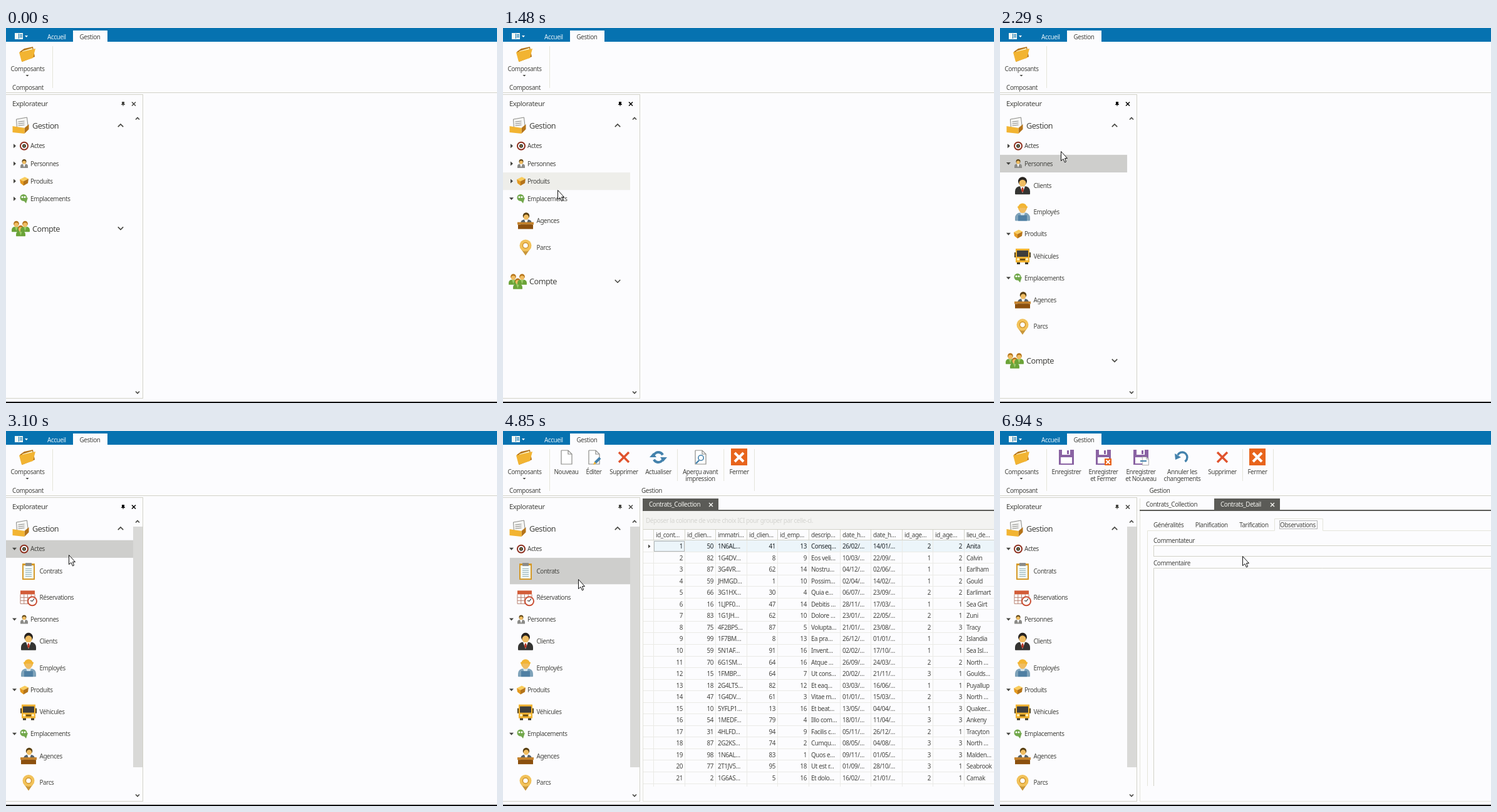
Recreate the animation shown at these times as an HTML page with a canvas. Size 784x600 px, loop 7080 ms.

```html
<!DOCTYPE html>
<html lang="fr">
<head>
<meta charset="utf-8">
<title>Gestion</title>
<style>
  html, body { margin: 0; width: 100%; height: 100%; overflow: hidden; background: #fcfcfe; }
  canvas { display: block; }
</style>
</head>
<body>
<canvas id="stage" width="784" height="600"></canvas>
<script>
const ctx = document.getElementById('stage').getContext('2d');
const LOOP = 7080, TICKS = 105, LIST_TICK = 63, DETAIL_TICK = 100;
const BG = '#fcfcfe', INK = '#464642', EDGE = '#e4e4da', GRID = '#eaeae6', RULE = '#d2d2c8',
      DARK = '#5b5b57', HOVER = '#eeeeea', PRESS = '#cececc', THUMB = '#d9d9d7',
      RED = '#e0522c', ORANGE = '#e8641c', BLUE = '#4482ac', SKIN = '#f0bd62',
      GOLD = '#f2b432', BROWN = '#b5741a', PAPER = '#8b8b88';

// ---- drawing helpers ----
function rect(color, x, y, w, h) { ctx.fillStyle = color; ctx.fillRect(x, y, w, h); }

function disc(color, x, y, r) {
  ctx.fillStyle = color;
  ctx.beginPath();
  ctx.arc(x, y, r, 0, Math.PI * 2);
  ctx.fill();
}

function trace(pts) {
  ctx.beginPath();
  for (let i = 0; i < pts.length; i += 2) ctx.lineTo(pts[i], pts[i + 1]);
}

function poly(color, ...pts) { trace(pts); ctx.fillStyle = color; ctx.fill(); }

function line(color, width, ...pts) {
  trace(pts);
  ctx.strokeStyle = color;
  ctx.lineWidth = width;
  ctx.stroke();
}

function arc(color, width, r, from, to) {
  ctx.strokeStyle = color;
  ctx.lineWidth = width;
  ctx.beginPath();
  ctx.arc(0, 0, r, from, to);
  ctx.stroke();
}

function frame(color, x, y, w, h, dash = []) {
  ctx.setLineDash(dash);
  ctx.strokeStyle = color;
  ctx.lineWidth = 1;
  ctx.strokeRect(x + .5, y + .5, w, h);
  ctx.setLineDash([]);
}

function setFont(size = 9.9) {
  ctx.font = `${size}px "Noto Sans", "Open Sans", sans-serif`;
  ctx.letterSpacing = `${-size * .041}px`;
}

function text(str, x, y, { size = 9.9, color = INK, align = 'left' } = {}) {
  setFont(size);
  ctx.textAlign = align;
  ctx.fillStyle = color;
  ctx.fillText(str, x, y + size * .36);
}

function at(x, y, draw, scale = 1) {
  ctx.save();
  ctx.translate(x, y);
  ctx.scale(scale, scale);
  draw();
  ctx.restore();
}

function cross(color, r, width, x = 0, y = 0) {
  line(color, width, x - r, y - r, x + r, y + r);
  line(color, width, x - r, y + r, x + r, y - r);
}

const chevron = (x, y, up, r) => line(INK, 1.6, x - r, y + up * r / 2, x, y - up * r / 2, x + r, y + up * r / 2);

// ---- icons, each drawn around its own centre ----
function person(coat, hair, shirt = '#fff') {
  ctx.fillStyle = coat;
  ctx.beginPath();
  ctx.roundRect(-12, 1, 24, 13, [8, 8, 1, 1]);
  ctx.fill();
  poly(shirt, -4, 1, 4, 1, 0, 12);
  disc(hair, 0, -7, 7);
  disc(SKIN, 0, -4, 5.5);
}

function page() {
  const sheet = [-8, -11, 3, -11, 9, -5, 9, 11, -8, 11, -8, -11];
  poly('#fff', ...sheet);
  line(PAPER, 1.2, ...sheet);
  line(PAPER, 1.2, 3, -11, 3, -5, 9, -5);
}

function floppy() {
  rect('#8a63a3', -12, -12, 24, 24);
  rect('#fff', -7, -12, 13, 8);
  rect('#8a63a3', 1, -11, 3, 6);
  rect('#fff', -9, 0, 18, 10);
}

const icons = {
  folder() {
    poly(BROWN, -12, -4, -5, -9, 9, -12, 12, 4, -8, 12);
    poly('#fff5c8', -8, -5, 8, -10, 9, -5, -8, 0);
    poly(GOLD, -13, -3, 13, -9, 9, 6, -9, 12);
  },
  drawer() {
    poly('#f6f6f4', -7, -10, 10, -13, 12, 4, -6, 6);
    line(PAPER, 1, -6, 5, -7, -10, 10, -13, 12, 4);
    for (let y = -6; y <= 0; y += 3) line(PAPER, 1, -4, y, 6, y - 1);
    poly(BROWN, 6, 4, 13, -2, 13, 6, 6, 13);
    poly(GOLD, -13, 1, 6, 4, 6, 13, -13, 11);
  },
  crowd() {
    for (let i = -1; i <= 1; i++)
      at(i * 7, i ? -3 : 4, () => person('#6ba338', BROWN, '#9bcb68'), .62);
  },
  target() {
    ['#8c2d1c', '#fff', '#3c4038', '#d8a040'].forEach((color, i) => disc(color, 0, 0, 7 - 2 * i));
  },
  user: () => at(0, 0, () => person(PAPER, '#5f4618'), .5),
  cube() {
    poly('#f9cc5c', -7, -3, 1, -7, 7, -4, -1, 0);
    poly('#e49a20', -7, -3, -1, 0, -1, 7, -6, 3);
    poly(BROWN, -1, 0, 7, -4, 6, 3, -1, 7);
  },
  place() {
    disc('#72a84c', -1, -2, 5.5);
    poly('#72a84c', -3, 0, 6, -2, 3, 7);
    for (const x of [-3, 1]) disc('#fff', x, -3, 1.5);
  },
  clipboard() {
    rect('#d69a28', -10, -12, 20, 26);
    rect('#f2fafa', -8, -9, 16, 21);
    rect(PAPER, -5, -13, 10, 5);
    for (let y = -4; y < 9; y += 3) rect('#8fadb4', -5, y, 10, 1);
  },
  booking() {
    rect('#fff', -13, -11, 23, 21);
    rect('#d25c38', -13, -11, 23, 6);
    for (let i = 0; i < 5; i++) line('#b88070', 1, -13 + i * 5.75, -5, -13 + i * 5.75, 10);
    for (let y = 0; y <= 10; y += 5) line('#b88070', 1, -13, y, 10, y);
    disc('#c94f34', 6, 6, 8);
    disc('#fff', 6, 6, 6);
    line('#444', 1.2, 9, 2, 6, 6, 3, 5);
  },
  client() {
    person('#343432', '#292420');
    poly('#b43220', -1, 3, 1, 3, 2, 8, 0, 11, -2, 8);
  },
  worker() {
    person('#7fa3ba', GOLD, '#d8e6ec');
    rect('#4f7fa3', -7, 5, 14, 9);
    rect(GOLD, -8, -9, 16, 2);
  },
  bus() {
    for (const x of [-9, 4]) rect('#3c3828', x, 8, 5, 5);
    rect(GOLD, -11, -12, 22, 22);
    rect('#3e3e3c', -9, -9, 18, 10);
    for (const x of [-13, 11]) rect('#54441c', x, -6, 2, 8);
    for (const x of [-7, 7]) disc('#fff3c0', x, 5, 2);
    rect('#705010', -4, 4, 8, 3);
  },
  desk() {
    at(1, -3, () => person('#55616a', '#5a4012'), .75);
    rect('#c4822c', -13, 2, 26, 4);
    rect('#8c500e', -12, 6, 24, 7);
  },
  pin() {
    poly('#c8963a', -9, 0, 9, 0, 0, 13);
    disc('#f2c25a', 0, -3, 9.5);
    disc('#c8891c', 0, -3, 5);
    disc('#fff', 0, -3, 3.8);
  },
  page,
  edit() {
    page();
    line(BLUE, 4, 2, 9, 10, 1);
    poly(GOLD, -1, 12, 1, 7, 4, 10);
  },
  remove: () => cross(RED, 8, 3.4),
  refresh() {
    for (const side of [1, -1]) at(0, 0, () => {
      arc(BLUE, 4, 8, .25, 2.65);
      poly(BLUE, 3, 0, 14, 0, 8, 7);
    }, side);
  },
  preview() {
    page();
    disc(BLUE, 1, 1, 5);
    disc('#fff', 1, 1, 3.4);
    line(BLUE, 2.4, -2, 5, -7, 10);
  },
  close() {
    rect(ORANGE, -13, -14, 26, 27);
    cross('#fff', 7, 4);
  },
  save: floppy,
  saveClose() {
    floppy();
    rect(ORANGE, 2, 2, 11, 11);
    cross('#fff', 3, 2, 7.5, 7.5);
  },
  saveNew() {
    floppy();
    at(7, 6, page, .6);
    line(BLUE, 2, -1, 6, 9, 6);
  },
  undo() {
    arc(BLUE, 3.4, 8, -2.7, 1);
    poly(BLUE, -12, -6, -11, 4, -2, 0);
  }
};

// ---- interface content ----
const groups = [
  ['Actes', 'target', { Contrats: 'clipboard', Réservations: 'booking' }],
  ['Personnes', 'user', { Clients: 'client', Employés: 'worker' }],
  ['Produits', 'cube', { Véhicules: 'bus' }],
  ['Emplacements', 'place', { Agences: 'desk', Parcs: 'pin' }]
];

// tick at which each item is clicked; a group opens two ticks later
const clicks = { Emplacements: 13, Produits: 24, Personnes: 31, Actes: 39, Contrats: 58 };
const isOpen = (name, tick) => tick >= clicks[name] + 2;

// pointer moves: departure tick, arrival tick, x, y
const moves = [
  [6, 13, 92, 272], [16, 19, 87, 259], [24, 34, 97, 197], [35, 37, 100, 198],
  [50, 52, 120, 237], [72, 82, 358, 204], [83, 86, 387, 200]
];

const SEP = [];
const listButtons = [
  ['page', 'Nouveau'], ['edit', 'Éditer'], ['remove', 'Supprimer'], ['refresh', 'Actualiser'], SEP,
  ['preview', 'Aperçu avant', 'impression'], SEP, ['close', 'Fermer']
];
const detailButtons = [
  ['save', 'Enregistrer'], ['saveClose', 'Enregistrer', 'et Fermer'], ['saveNew', 'Enregistrer', 'et Nouveau'],
  ['undo', 'Annuler les', 'changements'], ['remove', 'Supprimer'], SEP, ['close', 'Fermer']
];

const headers = 'id_cont id_clien immatri id_clien id_emp descrip date_h date_h id_age id_age lieu_de'.split(' ');
const plates = '1N6AL 1G4DV 3G4VR JHMGD 3G1HX 1LJPF0 1G1JH 4F2BP5 1F7BM 5N1AF 6G1SM 1FMBP 2G4LT5 1G4DV 5YFLP1 1MEDF 4HLFD 2G2KS 1N6AL 2T1JV5 1G6AS'.split(' ');
const notes = 'Conseq,Eos veli,Nostru,Possim,Quia e,Debitis ,Dolore ,Volupta,Ea pra,Invent,Atque ,Ut cons,Et eaq,Vitae m,Et beat,Illo com,Facilis c,Cumqu,Quos e,Ut est r,Et dolo'.split(',');
const towns = 'Anita,Calvin,Earlham,Gould,Earlimart,Sea Girt,Zuni,Tracy,Islandia,Sea Isl…,North …,Goulds…,Puyallup,North …,Quaker…,Ankeny,Tracyton,North …,Malden…,Seabrook,Camak'.split(',');

let seed = 7;
const random = max => {
  seed = seed * 16807 % 2147483647;
  return 1 + seed % max;
};
const twoDigits = n => String(n).padStart(2, '0');
const date = () => `${twoDigits(random(28))}/${twoDigits(random(12))}/…`;
const rows = plates.map((plate, i) => [
  i + 1, random(100), plate + '…', random(99), random(18), notes[i] + '…',
  date(), date(), random(3), random(3), towns[i]
]);

// ---- motion ----
function pointerAt(tick) {
  let x = 520, y = 300;
  for (const [from, to, toX, toY] of moves) {
    const f = Math.min(1, Math.max(0, (tick - from) / (to - from)));
    const ease = f * f * (3 - 2 * f);
    x += (toX - x) * ease;
    y += (toY - y) * ease;
  }
  return { x, y };
}

// ---- parts of the window ----
function drawRibbon(buttons) {
  let x = 82;
  setFont();
  for (const [icon, ...labels] of buttons) {
    if (!icon) {
      rect(EDGE, x - 3, 29, 1, 51);
      x += 6;
      continue;
    }
    const width = Math.max(...labels.map(label => ctx.measureText(label).width));
    const centre = Math.round(x + width / 2);
    at(centre, 42, icons[icon]);
    labels.forEach((label, i) => text(label, centre, 65 + 11.5 * i, { align: 'center' }));
    x += width + 12;
  }
  const end = Math.round(x - 3);
  rect(EDGE, end, 29, 1, 67);
  text('Gestion', (74 + end) / 2, 95, { align: 'center' });
}

function drawTop() {
  rect('#0672b0', 0, 0, 784, 22);
  rect('#f4f8f4', 14, 8, 13, 10);
  rect('#0672b0', 20, 9, 1, 8);
  for (let y = 10; y < 16; y += 2) rect('#0672b0', 22, y, 4, 1);
  poly('#fff', 30, 12, 35, 12, 32.5, 15);
  text('Accueil', 66, 14, { color: '#e4f1f8' });
  rect(BG, 107, 4, 55, 18);
  text('Gestion', 134, 14, { align: 'center' });

  at(34, 42, icons.folder);
  text('Composants', 34.5, 65, { align: 'center' });
  poly(INK, 31.5, 75, 36.5, 75, 34, 77.5);
  text('Composant', 35, 95, { align: 'center' });
  rect(EDGE, 74, 29, 1, 67);
  rect(RULE, 0, 103, 784, 1);
}

function drawExplorer(tick) {
  const active = tick >= clicks.Emplacements && tick < LIST_TICK ? '#000' : INK;
  frame(RULE, -1, 106, 219, 486);
  text('Explorateur', 10, 121, { size: 11.3 });
  rect(active, 185, 118, 4, 4);
  rect(active, 184, 122, 6, 1);
  rect(active, 186.5, 123, 1, 2);
  cross(active, 3, 1.5, 204, 121.5);

  ctx.save();
  ctx.beginPath();
  ctx.rect(0, 135, 218, 457);
  ctx.clip();
  at(23.5, 156, icons.drawer);
  text('Gestion', 42, 156.5, { size: 12.7 });
  chevron(183, 156, 1, 4.2);

  // Row highlights trail the pointer by two ticks.
  const { x: px, y: py } = pointerAt(tick - 2);
  let top = 174.7;
  const row = (name, icon, left, iconX, height) => {
    if (px < 203 && py >= top && py < top + height)
      rect(tick >= clicks[name] ? PRESS : HOVER, left, top, 203 - left, height);
    at(iconX, top + height / 2, icons[icon]);
    text(name, iconX + (left ? 17.5 : 10), top + height / 2);
    top += height;
  };
  for (const [name, icon, children] of groups) {
    const open = isOpen(name, tick), y = top + 14;
    row(name, icon, 0, 29, 28.2);
    if (open) poly(INK, 10, y - 2, 17, y - 2, 13.5, y + 2);
    else poly(INK, 12, y - 3.5, 16, y, 12, y + 3.5);
    if (open) for (const child in children) row(child, children[child], 11, 36, 42.3);
  }
  at(23.5, top + 33, icons.crowd);
  text('Compte', 42, top + 33.5, { size: 12.7 });
  chevron(183, top + 33, -1, 4.2);
  ctx.restore();

  if (isOpen('Actes', tick)) rect(THUMB, 203, 153, 15, 385);
  chevron(210, 145, 1, 3);
  chevron(210, 583, -1, 3);
}

function drawDocumentTab(label, x, w) {
  rect(DARK, x, 108, w, 19);
  text(label, x + 10, 117.5, { color: '#f4f4f0' });
  cross('#f4f4f0', 3, 1.4, x + w - 12, 118);
}

function drawGrid(tick) {
  const colX = i => Math.round(241 + 49.6 * i), rowY = i => Math.round(175 + 18.55 * i);
  rect('#f3f3f1', 224, 128, 560, 29);
  text('Déposer la colonne de votre choix ICI pour grouper par celle-ci.', 228, 143.5, { color: '#d4d4d0' });
  rect('#ecf5fa', 241, 175, 543, 18);
  for (const y of [157, 174]) rect(RULE, 224, y, 560, 1);
  headers.forEach((name, i) => {
    rect(RULE, colX(i) - 1, 158, 1, 17);
    rect(GRID, colX(i) - 1, 175, 1, 394);
    text(name + '…', colX(i) + 3, 166);
  });
  rows.forEach((row, r) => {
    const y = rowY(r) + 9.3, color = r ? INK : '#20262a';
    rect(GRID, 224, rowY(r + 1) - 1, 560, 1);
    row.forEach((value, c) => {
      if (typeof value === 'number') text(value, colX(c + 1) - 4, y, { color, align: 'right' });
      else text(value, colX(c) + 3, y, { color });
    });
  });
  poly(INK, 232, 181.5, 235.5, 184.5, 232, 187.5);
  frame('#777', colX(tick < 90 ? 0 : 2), 176, 48, 16, [1, 1]);
}

function drawDetail() {
  let x = 245;
  for (const label of ['Généralités', 'Planification', 'Tarification', 'Observations']) {
    text(label, x, 150);
    x += ctx.measureText(label).width + 18.5;
  }
  line(EDGE, 1, 235.5, 568, 235.5, 159.5, 438.5, 159.5, 438.5, 140.5, 515.5, 140.5, 515.5, 159.5, 784, 159.5);
  frame('#666', 446, 143, 60, 13, [1, 1]);
  text('Commentateur', 245, 175.5);
  frame(RULE, 245, 183, 560, 17);
  text('Commentaire', 245, 211);
  line(RULE, 1, 245.5, 568, 245.5, 219.5, 784, 219.5);
}

function drawDocument(tick) {
  frame(EDGE, 223, 108, 570, 484);
  rect(BG, 224, 104, 560, 22);
  rect(DARK, 223, 126, 561, 2);
  if (tick < DETAIL_TICK) {
    drawRibbon(listButtons);
    drawDocumentTab('Contrats_Collection', 223, 121);
    if (tick > LIST_TICK) drawGrid(tick);
  } else {
    drawRibbon(detailButtons);
    text('Contrats_Collection', 233, 117.5);
    drawDocumentTab('Contrats_Detail', 342, 105);
    if (tick > DETAIL_TICK) drawDetail();
  }
}

function drawPointer(tick) {
  if (tick < moves[0][0]) return;
  const { x, y } = pointerAt(tick);
  at(Math.round(x) + .5, Math.round(y) + .5, () => {
    const arrow = [0, 0, 0, 15, 3.5, 12, 6, 17.5, 8, 16.5, 6, 11, 10, 11, 0, 0];
    poly('#fff', ...arrow);
    line('#111', 1, ...arrow);
  });
}

function render(now) {
  const tick = Math.floor((now % LOOP) / LOOP * TICKS + .1);
  rect(BG, 0, 0, 784, 600);
  drawTop();
  drawExplorer(tick);
  if (tick >= LIST_TICK) drawDocument(tick);
  rect('#000', 0, 598, 784, 2);
  drawPointer(tick);
}

const start = performance.now();
(function loop() {
  render(performance.now() - start);
  requestAnimationFrame(loop);
})();
</script>
</body>
</html>
```
